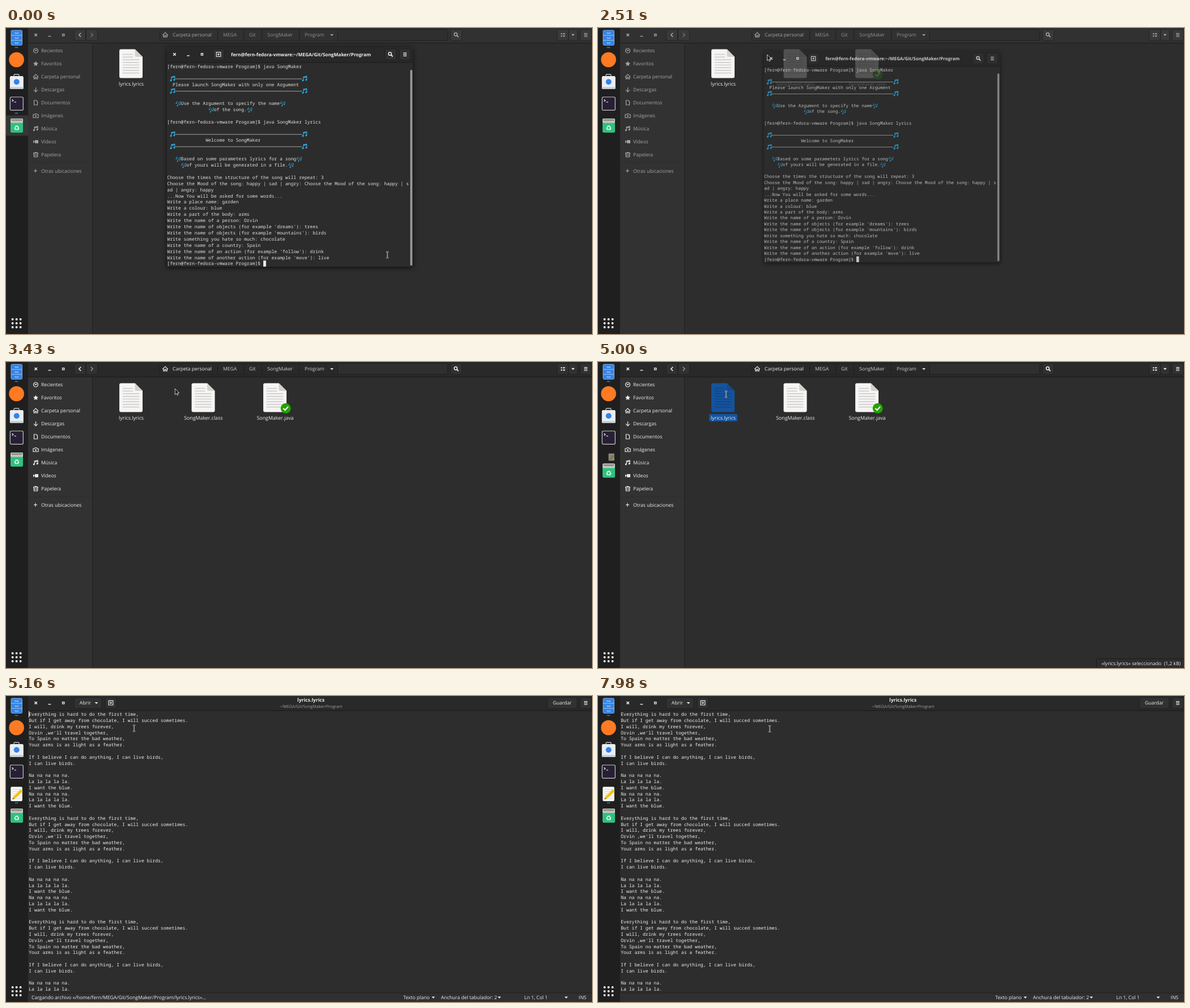
An HTML page for the animation above (8 s loop, 1034 by 541 pixels).

```html
<!DOCTYPE html>
<html lang="es">
<head>
<meta charset="utf-8">
<title>SongMaker</title>
<style>
html, body { margin: 0; height: 100%; overflow: hidden; background: #2d2d2d; }
svg { display: block; width: 100vw; height: 100vh; color: #eeeeec; }
text { font: 8.6px "Open Sans", "Noto Sans", sans-serif; fill: currentColor; white-space: pre; text-rendering: geometricPrecision; }
.b { font-weight: 700; }
.mid { text-anchor: middle; }
.label { font-size: 8.8px; text-anchor: middle; }
.mono text { font: 8.087px "Noto Sans Mono", "DejaVu Sans Mono", monospace; }
.ln { fill: none; stroke: currentColor; stroke-width: 1.2; }
.fill { fill: currentColor; }
</style>
</head>
<body>
<svg id="stage" viewBox="0 0 1034 541" preserveAspectRatio="none"></svg>
<script>
const COL = 4.852;
const rect = (x, y, w, h, fill, more = '') => `<rect x="${x}" y="${y}" width="${w}" height="${h}" fill="${fill}" ${more}/>`;
const text = (x, y, s, more = '') => `<text x="${x}" y="${y}" ${more}>${s}</text>`;
const path = (d, more = 'class="ln"') => `<path d="${d}" ${more}/>`;
const at = (x, y, s) => `<g transform="translate(${x} ${y})">${s}</g>`;
const group = (id, s, more = '') => `<g id="${id}" ${more}>${s}</g>`;
const FILL = 'class="fill"';

// Icons, centred on 0,0
const icon = {
  clock: '<circle r="4" class="ln"/>' + path('M-2-1.5L0 .5 2-1.5'),
  star: path('M0-4.6L1.4-1.5 4.6-1.2 2.2 1 2.9 4.3 0 2.6-2.9 4.3-2.2 1-4.6-1.2-1.4-1.5Z', FILL),
  home: path('M-4.7 .6L0-4 4.7 .6M-3.2 0V4H-1V1H1V4H3.2V0'),
  down: path('M0-4V3.5M-3.5 .3L0 3.8 3.5 .3'),
  doc: path('M-3-4H1L3-2V4H-3Z'),
  camera: path('M-4.5-2H-2L-1-3.5H1L2-2H4.5V3.5H-4.5Z') + '<circle cy=".7" r="1.4" class="fill"/>',
  music: path('M-2.2 2.8V-3L3.6-4V1.8M-2.2-1.3L3.6-2.3') + '<circle cx="-3.2" cy="2.8" r="1.5" class="fill"/><circle cx="2.6" cy="1.8" r="1.5" class="fill"/>',
  video: path('M-1.5-2.8H4.5V2.8H-1.5ZM-4.5-2.5L-2-.5V.5L-4.5 2.5Z', FILL),
  bin: path('M-4.5-2.8H4.5M-2-4H2M-3.6-2.8L-3 4H3L3.6-2.8M-1.3-1V2.3M1.3-1V2.3'),
  plus: path('M-3 0H3M0-3V3'),
  close: path('M-2.2-2.2L2.2 2.2M2.2-2.2L-2.2 2.2', 'class="ln" style="stroke-width:1.5"'),
  min: path('M-2.4 2.4H2.4', 'class="ln" style="stroke-width:1.4"'),
  max: path('M-1.6-1.6H1.6V1.6H-1.6Z', 'class="ln" style="stroke-width:1.3"'),
  menu: path('M-3-2.6H3M-3 0H3M-3 2.6H3'),
  search: '<circle cx="-1" cy="-1" r="2.6" class="ln" style="stroke-width:1.5"/>' + path('M1 1L3.8 3.8', 'class="ln" style="stroke-width:1.9"'),
  tab: path('M-3.8-3.8H3.8V3.8H-3.8ZM-2 0H2M0-2V2'),
  list: path('M-3.5-2H-1.2M.3-2H3.8M-3.5 2H-1.2M.3 2H3.8', 'class="ln" style="stroke-width:2"'),
  drop: path('M-3-1.4H3L0 1.8Z', FILL),
  left: path('M1.7-3.4L-1.7 0 1.7 3.4', 'class="ln" style="stroke-width:1.6"'),
  right: path('M-1.7-3.4L1.7 0-1.7 3.4', 'class="ln" style="stroke-width:1.6" opacity=".5"'),
};
const put = (name, x, y) => at(x, y, icon[name]);
const button = (x, y, w) => rect(x + .5, y + .5, w - 1, 19.6, '#fff', 'fill-opacity=".04" stroke="#191919" stroke-opacity=".6" rx="3"');
const iconButton = (name, x, y, w = 21) => button(x, y, w) + put(name, x + w / 2, y + 10.2);
const controls = (x, y) => put('close', x, y) + put('min', x + 24.2, y) + put('max', x + 48.5, y);

// File manager
function fileIcon(x, paper, fold, line) {
  let d = '';
  for (let i = 0; i < 8; i++) d += `M6 ${9.2 + i * 4.7}H${i < 2 ? 24 : 35}`;
  return at(x, 37.5, path('M3 0H27.5L41 13.5V48Q41 51 38 51H3Q0 51 0 48V3Q0 0 3 0Z', `fill="${paper}"`) +
    path('M27.5 0V11Q27.5 13.5 30 13.5H41Z', `fill="${fold}"`) +
    path(d, `stroke="${line}" stroke-width="1.7"`));
}
const plainFile = x => fileIcon(x, '#f6f5f4', '#d3d1cd', '#d0cfcb');
const label = (x, s) => text(x, 101.6, s, 'class="label"');

function manager() {
  const places = ['clock Recientes', 'star Favoritos', 'home Carpeta personal', 'down Descargas', 'doc Documentos',
    'camera Imágenes', 'music Música', 'video Vídeos', 'bin Papelera'];
  const side = places.map((p, i) => {
    const [name, ...words] = p.split(' '), y = 40 + 23 * i;
    return put(name, 52.5, y) + text(62, y + 3, words.join(' '));
  }).join('');
  const crumbs = [[294, 'Carpeta personal'], [383, 'MEGA'], [429, 'Git'], [461, 'SongMaker'], [527, 'Program']];
  const bar = rect(271.5, 2.5, 508, 19.6, '#2f2f2f', 'stroke="#1c1c1c" stroke-opacity=".8" rx="3"') +
    rect(272, 3, 313, 18.6, '', 'class="head"') +
    path('M373.5 3V22M419.5 3V22M451.5 3V22M517.5 3V22M585.5 3V22', 'stroke="#1c1c1c" stroke-opacity=".8"') +
    put('home', 281, 12) + crumbs.map(([x, s], i) => text(x, 15.2, s, i ? 'opacity=".82"' : '')).join('') + put('drop', 575, 12.3);
  const chrome = rect(39, 0, 995, 26, '', 'class="head"') + rect(39, 26, 995, 1, '#1b1b1b') +
    controls(52.7, 12.2) + iconButton('left', 120, 2) + iconButton('right', 141, 2) + bar +
    iconButton('search', 784, 2) + iconButton('list', 972, 2) + iconButton('drop', 992, 2, 17) + iconButton('menu', 1012.5, 2) +
    rect(39, 27, 113, 514, '#323232') + rect(152, 27, 1, 514, '#202020') + rect(39, 237.5, 113, 1, '#2d2d2d') +
    side + put('plus', 52, 252.5) + text(62, 255.5, 'Otras ubicaciones');
  const selected = fileIcon(200, '#15539e', '#124a90', '#114788') + rect(196, 92, 50, 13, '#15539e', 'rx="2"');
  return rect(153, 27, 881, 514, '#2d2d2d') + group('chrome', chrome) +
    group('plain', plainFile(200)) + group('selected', selected) + label(221, 'lyrics.lyrics') +
    group('info', rect(879.5, 524.5, 156, 18, '#2d2d2d', 'stroke="#1c1c1c" rx="2"') +
      text(1028, 536, '«lyrics.lyrics» seleccionado  (1,2 kB)', 'text-anchor="end"'));
}

// The two files that the terminal uncovers
function sources() {
  return plainFile(327.5) + label(348.3, 'SongMaker.class') + plainFile(454) + label(475, 'SongMaker.java') +
    '<circle cx="493.6" cy="81.8" r="9" fill="#26a000"/>' +
    path('M489.3 82L492.4 85 498 79', 'fill="none" stroke="#fff" stroke-width="2"');
}

// Terminal: ♪ and ♫ take two columns and are drawn as blue notes
const BLUE = '#2fa8e0';
const strokes = (d, w) => path(d, `fill="none" stroke="${BLUE}" stroke-width="${w}"`);
const head = (x, y, r) => `<circle cx="${x}" cy="${y}" r="${r}" fill="${BLUE}"/>`;
const note = {
  '♪': strokes('M2.7 7.8V1.6L8.6 .5V6.7M2.7 3L8.6 1.9', 1.2) + head(1.8, 7.9, 1.6) + head(7.6, 6.9, 1.6),
  '♫': strokes('M2.3 4.6L2.8 1.2 4 2.4M4.4 8.8L5.2 4.2 9.2 1.8 8.4 6.6', .8) +
    head(1.6, 4.8, 1) + head(3.7, 9, 1.1) + head(7.7, 6.8, 1.1),
};

function terminal() {
  const prompt = '[fern@fern-fedora-vmware Program]$ ';
  const rule = ' ♪' + '─'.repeat(46) + '♪';
  const mood = 'Choose the Mood of the song: happy | s';
  const lines = [prompt + 'java SongMaker', '', rule, '  Please launch SongMaker with only one Argument', rule, '',
    '   ♫Use the Argument to specify the name♫', ' '.repeat(15) + '♫of the song.♫', '',
    prompt + 'java SongMaker lyrics', '', rule, ' '.repeat(14) + 'Welcome to SongMaker', rule, '',
    '   ♫Based on some parameters lyrics for a song♫', '     ♫of yours will be generated in a file.♫', '',
    'Choose the times the structure of the song will repeat: 3',
    mood + 'ad | angry: ' + mood, 'ad | angry: happy', '...Now You will be asked for some words...',
    'Write a place name: garden', 'Write a colour: blue', 'Write a part of the body: arms',
    'Write the name of a person: Orvin', "Write the name of objects (for example 'dreams'): trees",
    "Write the name of objects (for example 'mountains'): birds", 'Write something you hate so much: chocolate',
    'Write the name of a country: Spain', "Write the name of an action (for example 'follow'): drink",
    "Write the name of another action (for example 'move'): live", prompt];
  const rows = lines.map((line, i) => {
    const y = 70.6 + 10.9 * i;
    let col = 0, marks = '', plain = '';
    for (const c of line) {
      const x = 284.3 + col * COL;
      if (note[c]) marks += at(x, y - 7.6, note[c]);
      if (c === '─') marks += rect(x, y - 2.9, COL, .9, '#b4b4b2');
      plain += note[c] ? '  ' : c === '─' ? ' ' : c;
      col += note[c] ? 2 : 1;
    }
    return text(284.3, y, plain) + marks;
  }).join('');
  return path('M284 422V38Q284 33 289 33H713Q718 33 718 38V422Z', 'fill="#2c2c2c" style="filter:drop-shadow(0 2px 4px #000a)"') +
    path('M284 61V38Q284 33 289 33H713Q718 33 718 38V61Z', 'fill="#282828"') + rect(284, 60.5, 434, 1, '#1b1b1b') +
    controls(297.4, 46.6) + iconButton('tab', 364.5, 36.5) + iconButton('search', 668, 36.5) + iconButton('menu', 693.5, 36.5) +
    text(520.4, 49.7, 'fern@fern-fedora-vmware:~/MEGA/Git/SongMaker/Program', 'class="b mid" style="font-size:8.3px"') +
    `<g class="mono" color="#e0e0de">${rows}</g>` + rect(454, 411.2, 4.8, 10.6, '#eee') +
    rect(713.3, 74, 3.6, 346, '#9a9a99', 'rx="1.8"');
}

// Text editor
function editor() {
  const hook = ['Na na na na na.', 'La la la la la.', 'I want the blue.'];
  const song = ['Everything is hard to do the first time,', 'But if I get away from chocolate, I will succed sometimes.',
    'I will, drink my trees forever,', "Orvin ,we'll travel together,", 'To Spain no matter the bad weather,',
    'Your arms is as light as a feather.', '', 'If I believe I can do anything, I can live birds,', 'I can live birds.', '',
    ...hook, ...hook, ''];
  const rows = [...song, ...song, ...song].slice(0, 46).map((s, i) => text(40.2, 35.2 + 10.8 * i, s)).join('');
  return rect(39, 0, 995, 541, '#2d2d2d') + rect(39, 0, 995, 26, '#292929') + rect(39, 25.5, 995, 1, '#1b1b1b') +
    controls(52.7, 12.2) + button(119.5, 2, 50) + text(129.8, 15.2, 'Abrir') + put('drop', 159.5, 12.3) +
    iconButton('tab', 174.5, 2) + button(955, 2, 53) + text(981.5, 15.2, 'Guardar', 'class="mid"') + iconButton('menu', 1012.5, 2) +
    text(538, 10, 'lyrics.lyrics', 'class="b mid"') +
    text(538, 20.6, '~/MEGA/Git/SongMaker/Program', 'class="mid" style="font-size:7.2px" opacity=".6"') +
    `<g class="mono">${rows}</g>` + rect(40, 26.5, 1, 11.5, '#eee', 'id="caret"') +
    rect(39, 525, 995, 16, '#303030') + rect(39, 524.5, 995, 1, '#202020') +
    text(45, 536.2, 'Cargando archivo «/home/fern/MEGA/Git/SongMaker/Program/lyrics.lyrics»…', 'id="loading"') +
    text(701, 536.2, 'Texto plano') + put('drop', 754, 533) + text(767.5, 536.2, 'Anchura del tabulador: 2') + put('drop', 870.5, 533) +
    text(914.5, 536.2, 'Ln 1, Col 1') + put('drop', 988.5, 533) + text(1010.5, 536.2, 'INS');
}

function dock() {
  const mark = (y, id, fill) => rect(15.5, y, 6, 1.8, fill, `rx=".9" id="${id}"`);
  const cabinet = rect(9, 4, 19.5, 26.5, '#3584e4', 'rx="2" stroke="#84b6f0" stroke-width=".9"') +
    path('M9 13H28.5M9 21.8H28.5', 'stroke="#a9cdf5" stroke-width=".9"') +
    path('M16 8V9.2H21.5V8M16 16.8V18H21.5V16.8M16 25.6V26.8H21.5V25.6', 'fill="none" stroke="#e6f0fb" stroke-width=".9"');
  const bag = path('M14 87V83.5Q14 82 15.5 82H21.5Q23 82 23 83.5V87', 'fill="none" stroke="#b9c4d0" stroke-width="1.3"') +
    rect(6.8, 85, 24, 23, '#e9edf2', 'rx="2.5"') + rect(6.8, 104.5, 24, 3.5, '#c3ccd6', 'rx="1.7"') + '<circle cx="18.7" cy="95.3" r="5" fill="#3584e4"/>';
  const shell = rect(7.3, 122, 23, 23.4, '#272034', 'rx="2.2" stroke="#c9c7cc" stroke-width="1.2"') +
    path('M10.5 126.5L13 128.3 10.5 130M14.5 131H18', 'fill="none" stroke="#fff" stroke-width="1.1"');
  const pad = rect(-10.3, -12.5, 20.5, 25.5, '#f6f5f4', 'rx="2"') + path('M-7-8H7M-7-4H7M-7 0H7M-7 4H7M-7 8H7', 'stroke="#d5d3cf" stroke-width=".9"') +
    path('M-7 9.5L-5.8 5.3 7.5-8.2 11-4.7-2.7 8.5Z', 'fill="#f5c211"') + path('M-7 9.5L-6.3 7 -4.5 8.9Z', 'fill="#3d3846"');
  const trash = rect(8, 160, 22, 25, '#2ec27e', 'rx="2.5"') + rect(8, 160, 22, 7.8, '#c8c6c2', 'rx="2"') + rect(9.5, 161.3, 19, 3, '#8f8d89', 'rx="1"') +
    text(19, 181.3, '♻', 'class="mid" style="font:12px \'DejaVu Sans\',sans-serif;fill:#fff"');
  let grid = '';
  for (let i = 0; i < 9; i++) grid += `<circle cx="${11.6 + 7 * (i % 3)}" cy="${515.1 + 7 * (i / 3 | 0)}" r="2" fill="#f2f2f2"/>`;
  return rect(0, 0, 39, 541, '#1f1f1f') + rect(0, 154.5, 39, 36, '#363636', 'id="hover" rx="2"') +
    cabinet + mark(33.4, 'filesMark', '#1b7fd0') +
    '<circle cx="18.6" cy="56" r="13.3" fill="#ff7a22"/>' + bag + shell + mark(149.8, 'shellMark', '#1b7fd0') +
    group('pad', pad) + mark(188, 'padMark', '#1f8a70') + group('trash', trash) + grid;
}

const beam = 'M-2.2-5.4H-.8Q0-5.4 0-4.6V4.6Q0 5.4-.8 5.4H-2.2M2.2-5.4H.8Q0-5.4 0-4.6M0 4.6Q0 5.4 .8 5.4H2.2';
const pointer = group('arrow', path('M0 0V10.6L2.5 8.4 4 11.8 5.7 11 4.2 7.7H7.3Z', 'fill="#151515" stroke="#ddd" stroke-width=".9" stroke-linejoin="round"')) +
  group('beam', path(beam, 'fill="none" stroke="#cfcfcf" stroke-width="1.7"') + path(beam, 'fill="none" stroke="#222" stroke-width=".6"'));

const $ = id => document.getElementById(id);
$('stage').innerHTML = manager() + group('terminal', terminal()) + group('sources', sources()) +
  group('editor', editor()) + dock() + group('pointer', pointer);
const heads = document.querySelectorAll('.head');

// time, x, y
const moves = [[1000, 673, 401], [1100, 628, 352], [1370, 465, 182], [1600, 372, 95], [1800, 330, 57], [1830, 330, 57],
  [2000, 308, 50], [2150, 298.5, 47], [3430, 298.5, 47], [3700, 230, 62], [3800, 207, 67.5], [4010, 226, 57],
  [6580, 226, 57], [6830, 240, 57], [6980, 240, 57], [7230, 276, 58], [7470, 276, 58], [7600, 303, 58], [8000, 303, 58]];
const ramp = (t, from, span) => Math.min(1, Math.max(0, (t - from) / span));
const easeOut = u => 1 - (1 - u) ** 2;
const lerp = (a, b, u) => a + (b - a) * u;
const grey = v => `rgb(${v},${v},${v})`;
const show = (id, on) => { $(id).style.display = on ? '' : 'none'; };
const fade = (id, v) => { $(id).style.opacity = v; };
const move = (id, x, y, scale = 1) => $(id).setAttribute('transform', `translate(${x} ${y}) scale(${scale})`);
const zoom = (id, cx, cy, s) => move(id, cx * (1 - s), cy * (1 - s), s);

function position(t) {
  if (t <= moves[0][0]) return moves[0].slice(1);
  const i = moves.findIndex(m => m[0] > t), a = moves[i - 1], b = moves[i];
  const u = ramp(t, a[0], b[0] - a[0]);
  return [lerp(a[1], b[1], u), lerp(a[2], b[2], u)];
}

function draw(t) {
  const [x, y] = position(t);
  const overText = t >= 5000 || (t < 1800 && y > 61);
  move('pointer', x, y);
  show('beam', overText);
  show('arrow', !overText);

  const closing = easeOut(ramp(t, 2495, 150));
  show('terminal', closing < 1);
  zoom('terminal', 501, 227.5, 1 - .2 * closing);
  fade('terminal', 1 - closing);
  fade('sources', closing);
  show('shellMark', t < 2410);
  show('hover', t < 2410);

  const focus = ramp(t, 2530, 200);
  $('chrome').style.color = grey(lerp(165, 238, focus));
  for (const h of heads) h.style.fill = grey(lerp(49, 41, focus));
  show('plain', t < 4380);
  show('selected', t >= 4380);
  show('info', t >= 4600);

  const grow = t < 5000 ? 0 : easeOut(ramp(t, 4942, 200));
  show('pad', grow > 0);
  show('padMark', t >= 5100);
  move('pad', 29 - 10.4 * grow, 163 + 10 * grow, grow || .01);
  fade('pad', grow);
  move('trash', 0, 39 * grow);

  const opening = 1 - 2 ** (-10 * ramp(t, 5020, 135));
  const open = opening > .998 ? 1 : opening;
  show('editor', t >= 5040);
  zoom('editor', 536.5, 270.5, Math.max(.01, open));
  fade('editor', open);
  show('caret', t < 5400 || (t >= 5810 && (t - 5810) % 1200 < 800));
  show('loading', t < 7980);
}

function tick() {
  draw(performance.now() % 8000);
  requestAnimationFrame(tick);
}
tick();
</script>
</body>
</html>
```
